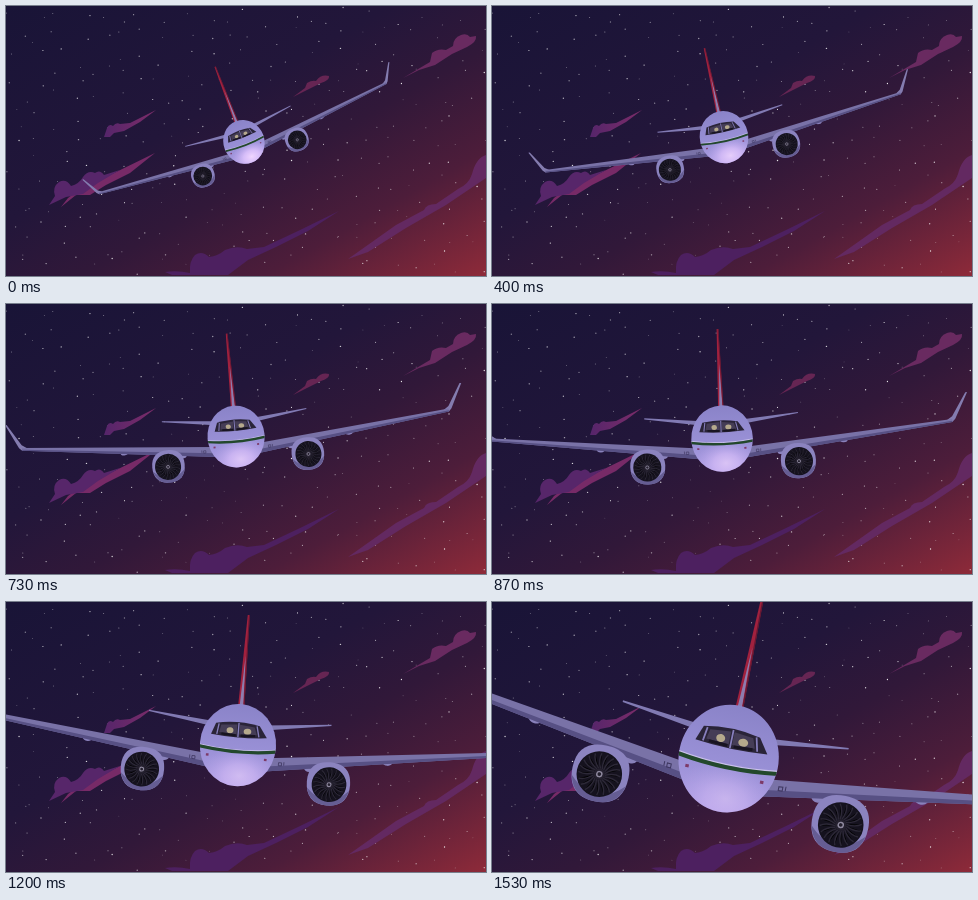
These frames come from a looping animation (480 by 270 pixels, 1.59 s). An HTML page:

```html
<!DOCTYPE html>
<html lang="en">
<head>
<meta charset="utf-8">
<title>Airliner at dusk</title>
<style>
html, body { margin: 0; width: 100%; height: 100%; overflow: hidden; background: #191437; }
svg { display: block; width: 100vw; height: 100vh; }
</style>
</head>
<body>
<svg viewBox="0 0 480 270" preserveAspectRatio="none">
  <defs>
    <linearGradient id="sky" gradientUnits="userSpaceOnUse" x1="0" y1="0" x2="230" y2="409">
      <stop offset="0" stop-color="#191437"/>
      <stop offset=".4" stop-color="#22163a"/>
      <stop offset=".58" stop-color="#311839"/>
      <stop offset=".77" stop-color="#4d1d3a"/>
      <stop offset="1" stop-color="#8d2a39"/>
    </linearGradient>
    <linearGradient id="skin" x1="0" y1="0" x2="0" y2="1">
      <stop offset="0" stop-color="#8a83c8"/>
      <stop offset=".55" stop-color="#9990d6"/>
      <stop offset="1" stop-color="#b09fe4"/>
    </linearGradient>
    <radialGradient id="shine">
      <stop offset="0" stop-color="#f0d6ff"/>
      <stop offset=".4" stop-color="#e2c6ff" stop-opacity=".8"/>
      <stop offset="1" stop-color="#c4aef4" stop-opacity="0"/>
    </radialGradient>
    <linearGradient id="puff">
      <stop offset="0" stop-color="#55256a"/>
      <stop offset="1" stop-color="#7d2c69"/>
    </linearGradient>
    <clipPath id="hull"><ellipse rx="1" ry="1.08"/></clipPath>

    <!-- Right half of the airliner; one unit is the hull radius -->
    <g id="wing">
      <path d="M7.32-.22L7.5-.15L7.6-.25L8.02-1.1L7.96-1.1L7.5-.34Z" fill="#847caf"/>
      <g fill="#8981bb">
        <ellipse cx="3.95" cy=".23" rx=".13" ry=".09"/>
        <ellipse cx="1.92" cy=".5" rx=".14" ry=".1"/>
      </g>
      <path d="M.75 .3L7.5-.25V-.15L.75 .65Z" fill="#7972a7"/>
      <path d="M.75 .52L7.5-.19V-.15L.75 .65Z" fill="#575084"/>
      <path d="M1.1 .4h.08v.08h-.08zM1.24 .38v.09" fill="none" stroke="#3d365f" stroke-width=".02"/>
    </g>
    <g id="engine" transform="translate(2.45 .82) scale(.57)">
      <path d="M-1-.05C-1-.75-.6-1 0-1S1-.72 1-.02C1 .65 .65 1 0 1S-1 .65-1-.05Z" fill="#8b83bf"/>
      <path d="M-.97 .25Q0 1.25 .97 .25Q.8 1 0 1Q-.8 1-.97 .25Z" fill="#655d93"/>
      <circle cx=".03" cy=".03" r=".8" fill="#15121e"/>
      <g id="blades" stroke="#2c2837" stroke-width=".05"></g>
      <circle cx=".03" cy=".03" r=".2" fill="#25212f"/>
      <circle cx=".03" cy=".03" r=".09" fill="none" stroke="#8f899f" stroke-width=".05"/>
    </g>
    <path id="stab" d="M.7-.65L2.75-.84V-.8L.75-.5Z" fill="#817ab3"/>
  </defs>

  <rect width="480" height="270" fill="url(#sky)"/>
  <g id="stars" fill="#fff"></g>
  <g id="clouds">
    <path fill="url(#puff)" d="M98 131L101 122Q103 117 107 120Q110 116 114 118L124 117L150 104L134 116L118 125L108 127L104 131Z"/>
    <path fill="#772a67" d="M62 192L86 174L104 169L149 147L124 167L100 179L84 189L70 189L55 201Z"/>
    <path fill="#57266a" d="M43 199L49 190Q46 181 53 176Q60 172 65 180Q73 178 77 171Q82 164 89 167Q94 163 98 169L114 164L92 177L77 188L60 191Z"/>
    <path fill="#662553" d="M287 91L299 82L301 77Q306 74 310 75Q315 68 323 70Q324 74 315 77L301 84Z"/>
    <path fill="#692a60" d="M397 72L424 56L426 47Q432 42 440 44L447 40Q447 32 455 29Q461 27 464 31L470 30Q471 36 461 41L446 48L429 59L413 64Z"/>
    <path fill="#632961" d="M342 253L390 219L418 204Q420 198 430 198L452 183Q463 178 466 168Q470 152 480 149V172L440 199L400 222L362 246Z"/>
    <path fill="#4d2060" d="M159 266Q171 264 184 267Q183 255 189 249Q196 244 203 251Q212 250 219 244Q231 239 241 243L258 241L292 225L333 205L302 225L270 241L242 254L222 269H166Z"/>
  </g>

  <g id="plane">
    <g id="tail">
      <use href="#stab"/>
      <use href="#stab" transform="scale(-1 1)"/>
      <path d="M-.03-3.92H.03L.1-.9H-.1Z" fill="#a1213e"/>
      <path d="M.01-2.7L.07-.9H-.06Z" fill="#8c7daf"/>
      <path d="M.02-3.92L.09-.9" fill="none" stroke="#641832" stroke-width=".03"/>
    </g>
    <use id="wingR" href="#wing"/>
    <use id="wingL" href="#wing"/>
    <use href="#engine"/>
    <use href="#engine" transform="scale(-1 1)"/>
    <ellipse rx="1" ry="1.08" fill="url(#skin)"/>
    <g clip-path="url(#hull)">
      <ellipse id="glow" cx=".1" cy=".8" rx="1" ry=".75" fill="url(#shine)"/>
      <path d="M-1.02 .05Q0 .21 1.02 .05" fill="none" stroke="#c9c0ea" stroke-width=".03"/>
      <path d="M-1.02 .1Q0 .26 1.02 .1" fill="none" stroke="#23482c" stroke-width=".085"/>
    </g>
    <path d="M-.62-.54Q-.05-.66 .53-.54L.74-.24Q0-.16-.73-.24Z" fill="#2a2438"/>
    <path d="M-.48-.5L-.06-.54V-.28L-.52-.3ZM.01-.54L.4-.5L.47-.3L.01-.28Z" fill="#453d56"/>
    <path d="M-.54-.53L-.58-.25M-.02-.58V-.21M.46-.53L.53-.25" fill="none" stroke="#877fbd" stroke-width=".035"/>
    <ellipse cx="-.24" cy="-.37" rx=".09" ry=".08" fill="#b5a98c"/>
    <ellipse cx=".22" cy="-.37" rx=".1" ry=".08" fill="#b5a98c"/>
    <path d="M-.46-.27L-.08-.25M.05-.25L.43-.27" stroke="#181421" stroke-width=".06"/>
    <path d="M-.82 .28h.07v.06h-.07zM.71 .3h.07v.06h-.07z" fill="#7d3a68"/>
  </g>
</svg>
<script>
const $ = id => document.getElementById(id);
const add = (parent, tag, attrs) => {
  const el = document.createElementNS('http://www.w3.org/2000/svg', tag);
  for (const k in attrs) el.setAttribute(k, attrs[k]);
  parent.appendChild(el);
};
const move = (id, transform) => $(id).setAttribute('transform', transform);

// Night sky: one star per jittered grid cell
const CELL = 21;
let seed = 71;
const rnd = () => (seed = (seed * 16807) % 2147483647) / 2147483647;
for (let y = 0; y < 13; y++) {
  for (let x = 0; x < 23; x++) {
    add($('stars'), 'circle', {
      cx: (x + rnd()) * CELL,
      cy: (y + rnd()) * CELL,
      r: 0.35 + rnd() * 0.4,
      opacity: 0.4 + rnd() * 0.5
    });
  }
}

const BLADES = 20;
for (let i = 0; i < BLADES; i++) {
  add($('blades'), 'path', {
    d: 'M0-.2Q.14-.5 .06-.74',
    transform: `translate(.03 .03) rotate(${i * 360 / BLADES})`
  });
}

// The jet closes in at constant speed, so its size is inverse to the distance left
function draw(n) {
  const size = 800 / (39 - n);
  const roll = -21 + 1.43 * n;
  const x = 230 + 0.055 * (n - 12) ** 2;
  const y = 131 + 0.1 * (n - 7) ** 2;
  const lift = 0.00025 * n ** 3;   // wings seen more from below when near
  move('plane', `translate(${x} ${y}) rotate(${roll}) scale(${size})`);
  move('tail', `scale(${1 - 0.007 * n})`);   // the tail is farther away
  move('wingR', `skewY(${-lift})`);
  move('wingL', `scale(-1 1) skewY(${-lift})`);
  $('glow').setAttribute('opacity', 1 - n / 40);
}

// Hard steps, 15 per second, each starting on a 10 ms mark
const LOOP = 1590, COUNT = 24;
const startOf = n => Math.round(n * 20 / 3) * 10;
const t0 = performance.now();
function tick(now) {
  const t = Math.max(0, now - t0) % LOOP;
  let n = COUNT - 1;
  while (startOf(n) > t) n--;
  draw(n);
  requestAnimationFrame(tick);
}
draw(0);
requestAnimationFrame(tick);
</script>
</body>
</html>
```
